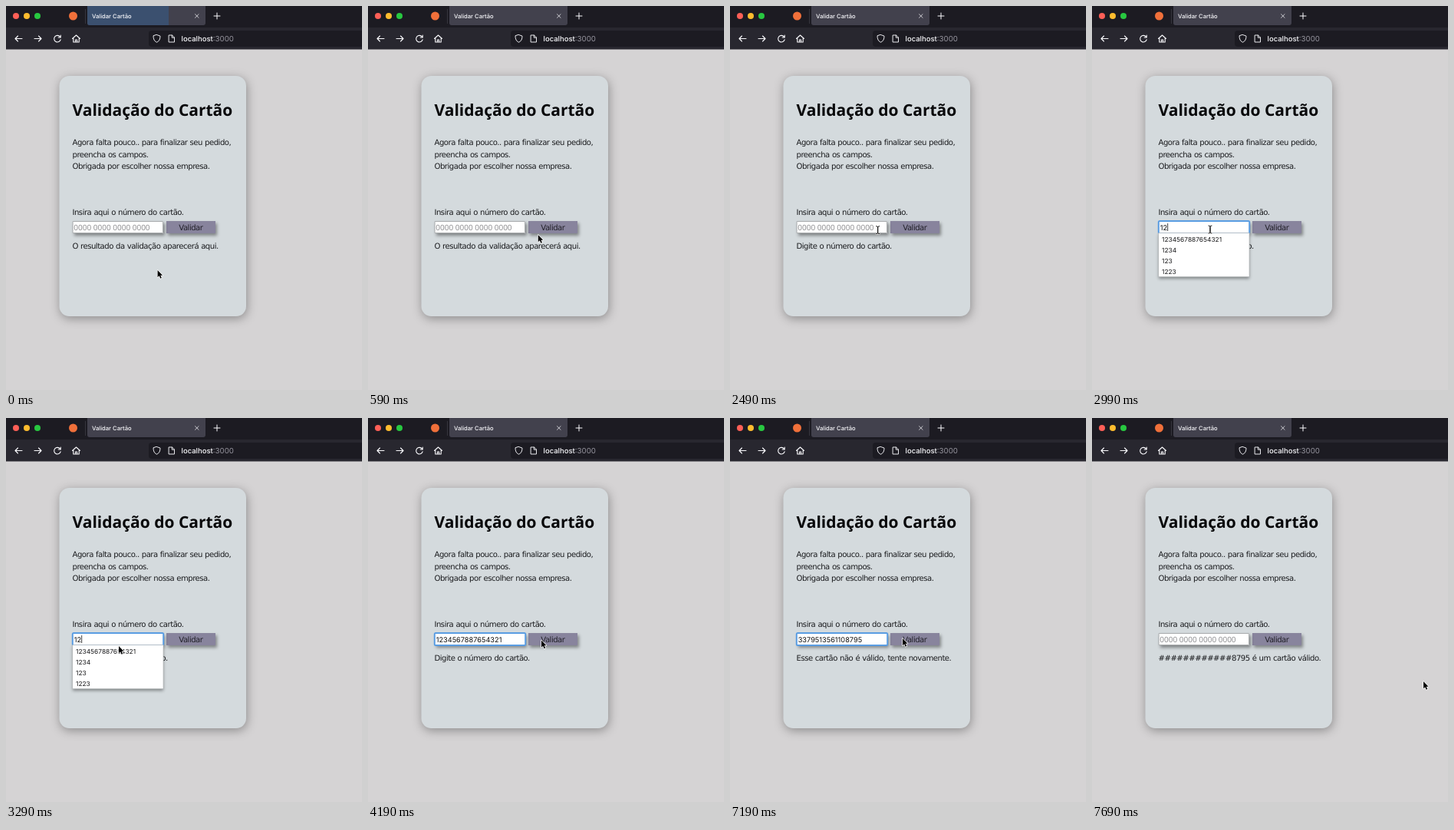
An HTML page with a canvas for the animation above (7.99 s loop, 464 by 500 pixels).

```html
<!DOCTYPE html>
<html lang="pt">
<head>
<meta charset="utf-8">
<title>Validar Cartão</title>
<style>
html, body { margin: 0; width: 100%; height: 100%; overflow: hidden; background: #d5d3d4; }
canvas { display: block; width: 464px; height: 500px; }
</style>
</head>
<body>
<canvas id="stage"></canvas>
<script>
const canvas = document.getElementById('stage');
const ctx = canvas.getContext('2d');
const dpr = window.devicePixelRatio || 1;
canvas.width = 464 * dpr;
canvas.height = 500 * dpr;
ctx.textRendering = 'geometricPrecision';

const LOOP = 7990;
const PAGE = '"DejaVu Sans", "Noto Sans", sans-serif';
const UI = 'Inter, Roboto, sans-serif';
const INK = '#1a1b1e';

// Pointer path: [tick, x, y], one tick per 100 ms
const PATH = [
  [0, 197.6, 344], [3, 206, 325], [7, 227, 289],
  [14, 227, 289], [15, 250, 291], [17, 451, 318], [18, 448, 317], [22, 212, 292],
  [24, 212, 292], [27, 154, 291], [32, 154, 291], [34, 140, 303],
  [37, 437, 300], [40, 250, 294], [42, 226, 289.5], [43, 226, 289.5], [47, 361, 306],
  [55, 361, 306], [56, 301, 305], [60, 152, 291],
  [68, 152, 291], [70, 185, 289], [72, 225, 287], [74, 226, 288], [76, 432, 343]
];

// State from a tick onward: [tick, value]
const RESULT = [
  [0, 'O resultado da validação aparecerá aqui.'],
  [15, 'Digite o número do cartão.'],
  [44, 'Esse cartão não é válido, tente novamente.'],
  [74, '############8795 é um cartão válido.']
];
const FIELD = [
  [0, ''], [28, '1'], [29, '12'], [34, '1234567887654321'],
  [44, ''], [65, '3379513561108795'], [74, '']
];
const FOCUS = [[0, false], [27, true], [44, false], [60, true], [74, false]];
const MENU = [[0, false], [28, true], [34, false]];
const CHOICES = ['1234567887654321', '1234', '123', '1223'];

const at = (list, k) => list.filter(s => s[0] <= k).pop()[1];

function pointer(k) {
  const i = PATH.findIndex(p => p[0] > k);
  if (i < 0) return PATH[PATH.length - 1].slice(1);
  const [k0, x0, y0] = PATH[i - 1], [k1, x1, y1] = PATH[i];
  const u = (k - k0) / (k1 - k0);
  return [x0 + (x1 - x0) * u, y0 + (y1 - y0) * u];
}

function box(x, y, w, h, r, fill) {
  ctx.beginPath();
  ctx.roundRect(x, y, w, h, r);
  ctx.fillStyle = fill;
  ctx.fill();
}

function dot(x, y, r, fill) {
  ctx.beginPath();
  ctx.arc(x, y, r, 0, Math.PI * 2);
  ctx.fillStyle = fill;
  ctx.fill();
}

function text(str, x, y, font, fill, spacing = 0, word = 0) {
  ctx.font = font;
  ctx.letterSpacing = spacing + 'px';
  ctx.wordSpacing = word + 'px';
  ctx.fillStyle = fill;
  ctx.fillText(str, x, y);
  return ctx.measureText(str).width;
}

const body = (str, x, y, fill = INK) =>
  text(str, x, y, '10.1px ' + PAGE, fill, -0.5, 0.4);

function line(d, color, width = 1.1) {
  ctx.strokeStyle = color;
  ctx.lineWidth = width;
  ctx.lineCap = ctx.lineJoin = 'round';
  ctx.stroke(new Path2D(d));
}

function shadow(color, blur, x, y) {
  ctx.shadowColor = color;
  ctx.shadowBlur = blur * dpr;
  ctx.shadowOffsetX = x * dpr;
  ctx.shadowOffsetY = y * dpr;
}
const noShadow = () => shadow('transparent', 0, 0, 0);

function browser(t) {
  box(0, 0, 464, 28, 0, '#1c1b22');
  box(0, 28, 464, 28.6, 0, '#28272f');
  dot(13, 13, 4, '#fe5f57');
  dot(27, 13, 4, '#febc2e');
  dot(41, 13, 4, '#28c840');
  dot(87.5, 13, 5.5, '#f0703a');
  box(103, 4, 1, 19, 0, '#35343d');

  box(106, 0, 154, 25, [0, 0, 3, 3], '#42414d');
  const glow = Math.max(0, 1 - Math.max(0, t - 100) / 200);
  if (glow > 0) {
    ctx.globalAlpha = glow;
    box(106, 0, 106, 25, [0, 0, 0, 3], '#3b506f');
    ctx.globalAlpha = 1;
  }
  text('Validar Cartão', 112, 16, '500 7.6px ' + UI, '#fbfbfe');
  line('M246.5 10.7l4.6 4.6M251.1 10.7l-4.6 4.6', '#d8d8dd', 0.9);
  line('M271 13h8M275 9v8', '#fbfbfe', 1);

  line('M21 42.5h-9M15.5 39l-3.5 3.5l3.5 3.5', '#fbfbfe');
  line('M37 42.5h9M42.5 39l3.5 3.5l-3.5 3.5', '#fbfbfe');
  line('M70.5 40.2a4.3 4.3 0 1 0 .7 3.5M71.2 38v3h-3', '#fbfbfe');
  line('M86.5 42.5l5-4.5l5 4.5M87.8 42v5h7.4v-5M90.5 47v-3h2v3', '#fbfbfe');

  box(186, 32, 290, 21, 4, '#1c1b22');
  line('M196.5 37.5l4.5 1.6c0 4-1.2 6.6-4.5 8.2c-3.3-1.6-4.5-4.2-4.5-8.2z', '#e8e8ec', 1);
  line('M212.5 38h4l3 3v6h-7zM216.3 38v3.2h3', '#e8e8ec', 1);
  const w = text('localhost', 228.5, 46, '500 9.5px ' + UI, '#fbfbfe');
  text(':3000', 228.5 + w, 46, '9.7px ' + UI, '#96959e');
}

function card(result) {
  shadow('rgba(0,0,0,.34)', 13, 1, 3);
  box(69.5, 91, 243.5, 313, 13, '#d4dadd');
  noShadow();
  text('Validação do Cartão', 86.5, 143.2, 'bold 21px "Noto Sans", sans-serif', '#08080a');
  body('Agora falta pouco.. para finalizar seu pedido,', 86.5, 180.5);
  body('preencha os campos.', 86.5, 196.5);
  body('Obrigada por escolher nossa empresa.', 86.5, 212);
  body('Insira aqui o número do cartão.', 86.5, 272);
  body(result, 86.5, 315.5);
}

function form(value, focus) {
  shadow('rgba(0,0,0,.4)', 4, 2, 3);
  box(209, 280, 64, 16, 0, '#88849d');
  box(87, 280, 118, 16, 0, '#fff');
  noShadow();
  body('Validar', 225.3, 291.5, '#222129');

  if (focus) {
    ctx.strokeStyle = '#5a9de2';
    ctx.lineWidth = 2;
    ctx.beginPath();
    ctx.roundRect(86.8, 280, 118.4, 16, 1.5);
    ctx.stroke();
  } else {
    ctx.strokeStyle = '#a9acae';
    ctx.lineWidth = 1;
    ctx.strokeRect(87.5, 280.5, 117, 15);
  }

  if (value) {
    const w = text(value, 88.7, 291.5, '9.2px ' + UI, '#111');
    if (value.length < 3) box(89 + w, 283, 0.8, 10, 0, '#111');
  } else {
    text('0000 0000 0000 0000', 88.3, 291.5, '10px "Open Sans", sans-serif', '#868689');
  }
}

function menu() {
  shadow('rgba(0,0,0,.4)', 4, 0, 2);
  box(87, 295.5, 118, 57, 0, '#fff');
  noShadow();
  ctx.strokeStyle = '#b9bcbe';
  ctx.lineWidth = 0.7;
  ctx.strokeRect(87, 295.5, 118, 57);
  CHOICES.forEach((c, i) => text(c, 91, 306.5 + i * 14, '8.4px ' + UI, '#18181a'));
}

function arrow(x, y) {
  ctx.save();
  ctx.translate(x, y);
  const p = new Path2D('M0 0V9.2L2.1 7.3L3.6 10.8L5.2 10.1L3.7 6.7H6.5Z');
  ctx.lineJoin = 'round';
  ctx.strokeStyle = '#fff';
  ctx.lineWidth = 1.4;
  ctx.stroke(p);
  ctx.fillStyle = '#000';
  ctx.fill(p);
  ctx.restore();
}

function beam(x, y) {
  const d = `M${x - 2} ${y - 5}q2 0 2 1.5v7q0 1.5 -2 1.5M${x + 2} ${y - 5}q-2 0 -2 1.5v7q0 1.5 2 1.5`;
  line(d, 'rgba(255,255,255,.8)', 2);
  line(d, '#111', 1);
}

function draw(now) {
  const t = now % LOOP;
  const k = t < 100 ? 0 : Math.min(76, Math.floor((t + 10) / 100));
  ctx.setTransform(dpr, 0, 0, dpr, 0, 0);
  box(0, 0, 464, 500, 0, '#d5d3d4');
  browser(t);
  card(at(RESULT, k));
  form(at(FIELD, k), at(FOCUS, k));
  if (at(MENU, k)) menu();

  const [x, y] = pointer(k);
  const inField = x > 87 && x < 205 && y > 280 && y < 296;
  (inField ? beam : arrow)(x, y);
}

const start = performance.now();
function tick() {
  draw(performance.now() - start);
  requestAnimationFrame(tick);
}
tick();
</script>
</body>
</html>
```
